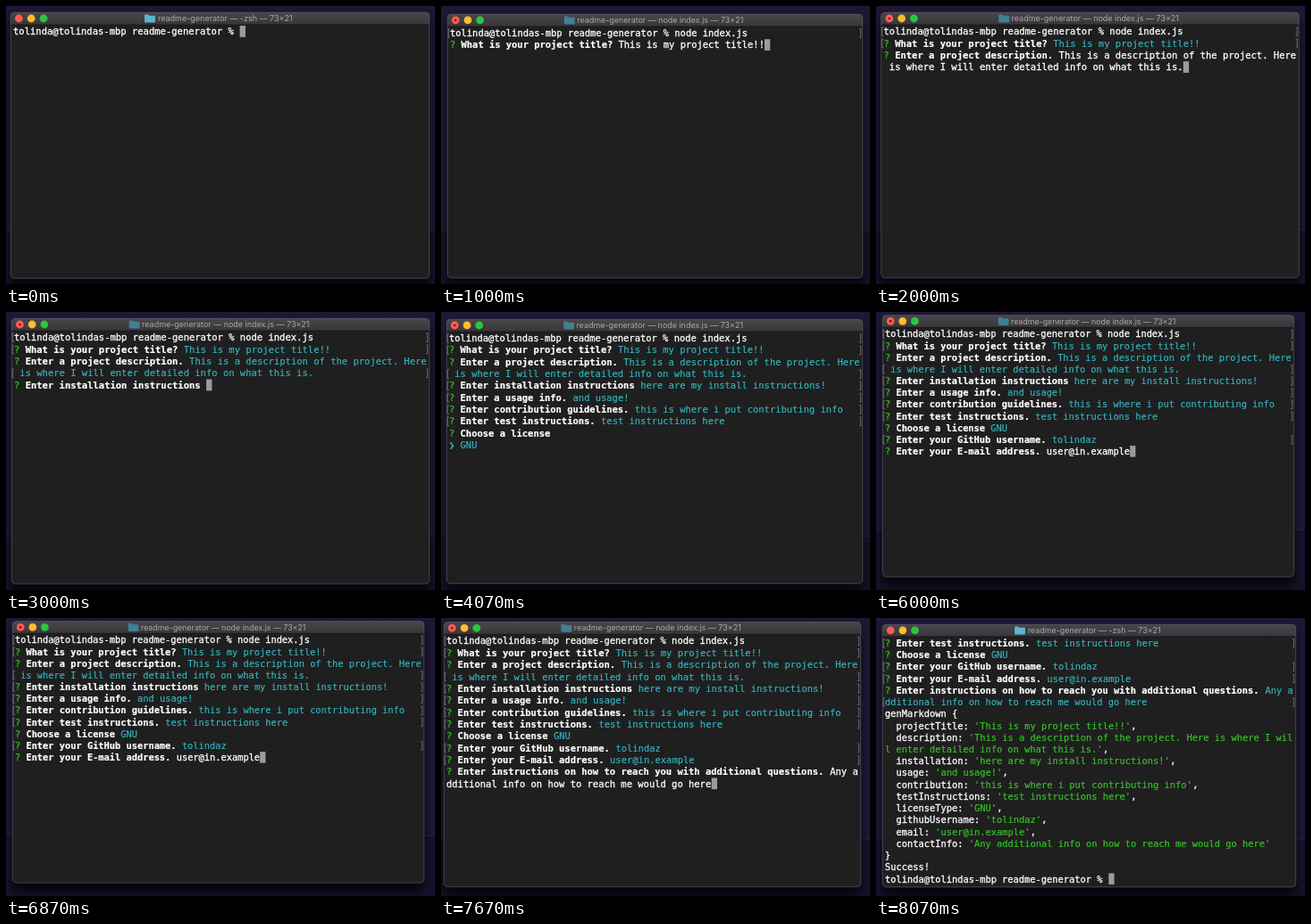
These frames come from a looping animation (480x312 px, 8990 ms). An HTML page:

```html
<!DOCTYPE html>
<html lang="en">
<head>
<meta charset="utf-8">
<title>Terminal questionnaire</title>
<style>
html, body { margin: 0; width: 100%; height: 100%; overflow: hidden; background: #130f27; }
svg { display: block; width: 480px; height: 312px; }
text { white-space: pre; }
.mono { font: 10.53px "DejaVu Sans Mono", "Noto Sans Mono", monospace; }
.plain { fill: #fff; stroke: #fff; stroke-width: .3; }
.bold { fill: #fff; stroke: #fff; stroke-width: .2; font-weight: 700; }
.cyan { fill: #35b6c1; stroke: #35b6c1; stroke-width: .15; }
.green { fill: #35c229; stroke: #35c229; stroke-width: .2; }
.title { font: 9px Inter, Roboto, sans-serif; fill: #aaa8ab; text-anchor: middle; }
.mark { fill: none; stroke: #858585; stroke-width: .8; }
</style>
</head>
<body>
<svg viewBox="0 0 480 312">
  <defs>
    <linearGradient id="bar" x2="0" y2="1">
      <stop stop-color="#4a464b"/><stop offset="1" stop-color="#39363a"/>
    </linearGradient>
    <filter id="blur" x="-10%" y="-10%" width="120%" height="120%">
      <feGaussianBlur stdDeviation="6"/>
    </filter>
  </defs>
  <g id="window">
    <rect x="-20" y="-20" width="520" height="265" fill="#1e1836"/>
    <rect x="-20" y="245" width="520" height="90" fill="#17122c"/>
    <path d="M-20 245H500" stroke="#332c4a" stroke-width=".8"/>
    <rect y="8" width="469" height="301" rx="5" fill="#000" opacity=".75" filter="url(#blur)"/>
    <rect width="469" height="299" rx="4.5" fill="#1f1f1f"/>
    <path d="M0 14V4.5Q0 0 4.5 0H464.5Q469 0 469 4.5V14Z" fill="url(#bar)"/>
    <path d="M0 14H469" stroke="#111" stroke-width=".6"/>
    <rect x=".3" y=".3" width="468.4" height="298.4" rx="4.5" fill="none" stroke="#5a565e" stroke-width=".7"/>
    <circle cx="9.4" cy="7" r="4.4" fill="#ff5b52"/>
    <circle cx="23.2" cy="7" r="4.4" fill="#fdbc2e"/>
    <circle cx="37" cy="7" r="4.4" fill="#28c73f"/>
    <circle id="busy" cx="9.4" cy="7" r="1.3" fill="#7c0f0b"/>
    <path id="folder" d="M0 3.2V1.2Q0 0 1.2 0H4L5.2 1.2H10.8Q12 1.2 12 2.4V8Q12 9 11 9H1Q0 9 0 8Z"/>
    <text id="title" class="title" x="240.3" y="10.2"></text>
    <g id="screen"></g>
  </g>
</svg>
<script>
const LOOP = 8990, SLIDE = 1000;
const COLS = 73, ROWS = 21, CELL = 6.34, LINE = 13.4, LEFT = 3, TOP = 15.1;
const PROMPT = 'tolinda@tolindas-mbp readme-generator % ';

// question, answer, key in the printed object
const FIELDS = [
  ['What is your project title?', 'This is my project title!!', 'projectTitle'],
  ['Enter a project description.', 'This is a description of the project. Here is where I will enter detailed info on what this is.', 'description'],
  ['Enter installation instructions', 'here are my install instructions!', 'installation'],
  ['Enter a usage info.', 'and usage!', 'usage'],
  ['Enter contribution guidelines.', 'this is where i put contributing info', 'contribution'],
  ['Enter test instructions.', 'test instructions here', 'testInstructions'],
  ['Choose a license', 'GNU', 'licenseType'],
  ['Enter your GitHub username.', 'tolindaz', 'githubUsername'],
  ['Enter your E-mail address.', 'user@in.example', 'email'],
  ['Enter instructions on how to reach you with additional questions.', 'Any additional info on how to reach me would go here', 'contactInfo']
];
const LICENSE = 6;

const line = (runs, marked = false) => ({ runs, marked });
const plain = (text, marked) => line([['plain', text]], marked);
const ask = (index, answer, style, marked) => line(
  [['green', '? '], ['bold', FIELDS[index][0] + ' '], [style, answer]], marked);

function session(answered, current) {
  const lines = [plain(PROMPT + 'node index.js', true)];
  for (let i = 0; i < answered; i++) lines.push(ask(i, FIELDS[i][1], 'cyan', i !== LICENSE));
  return current === undefined ? lines : [...lines, ask(answered, current, 'plain')];
}

const typed = index => session(index, FIELDS[index][1]);

function result() {
  const entries = FIELDS.map(([, answer, key], i) => line([
    ['plain', `  ${key}: `], ['green', `'${answer}'`], ['plain', i < FIELDS.length - 1 ? ',' : '']
  ]));
  return [...session(FIELDS.length), plain('genMarkdown {'), ...entries,
    plain('}'), plain('Success!'), plain(PROMPT)];
}

const slide = (x, y, width, lines, options) =>
  ({ x, y, width, lines, running: true, cursor: true, ...options });

const slides = [
  slide(5, 7, 469, [plain(PROMPT)], { running: false }),
  slide(7, 9, 465, typed(0)),
  slide(5.5, 7, 468, typed(1)),
  slide(6, 7, 468, session(2, '')),
  slide(6, 8, 466, [...session(LICENSE, ''), line([['cyan', '❯ GNU']])], { cursor: false }),
  slide(5, 9, 463, session(8, '')),
  slide(7, 3.5, 461, typed(8)),
  slide(3, 4.3, 467, typed(9)),
  slide(7, 7, 463, result(), { running: false })
];

// Breaks styled runs into terminal rows of COLS characters.
function wrap({ runs, marked }) {
  const rows = [{ cells: [], length: 0 }];
  for (let [style, text] of runs) {
    while (text) {
      let row = rows[rows.length - 1];
      if (row.length === COLS) rows.push(row = { cells: [], length: 0 });
      const part = text.slice(0, COLS - row.length);
      row.cells.push({ style, text: part, column: row.length });
      row.length += part.length;
      text = text.slice(part.length);
    }
  }
  rows[rows.length - 1].marked = marked;
  return rows;
}

const escapeText = text => text.replace(/&/g, '&amp;').replace(/</g, '&lt;');
const columnX = column => LEFT + column * CELL;

function rowMarkup(row, index) {
  const y = TOP + index * LINE;
  const text = row.cells.map(({ style, text, column }) =>
    `<text class="mono ${style}" x="${columnX(column)}" y="${y + 10.2}">${escapeText(text)}</text>`).join('');
  const marks = row.marked
    ? `<path class="mark" d="M3 ${y + 1.8}h-1.7v9.6h1.7M465 ${y + 1.8}h1.7v9.6h-1.7"/>` : '';
  return text + marks;
}

const find = id => document.getElementById(id);

function show({ x, y, width, lines, running, cursor }) {
  const rows = lines.flatMap(wrap).slice(-ROWS);
  const last = rows.length - 1;
  const block = cursor
    ? `<rect x="${columnX(rows[last].length)}" y="${TOP + last * LINE}" width="${CELL}" height="12.8" fill="#9b9b9b"/>` : '';
  find('screen').innerHTML = block + rows.map(rowMarkup).join('');
  find('window').setAttribute('transform', `translate(${x} ${y}) scale(${width / 469})`);
  find('title').textContent = `readme-generator — ${running ? 'node index.js' : '-zsh'} — 73×21`;
  find('folder').setAttribute('transform', `translate(${running ? 132 : 150} 2.6)`);
  find('folder').setAttribute('fill', running ? '#417f93' : '#5bb5d1');
  find('busy').setAttribute('visibility', running ? 'visible' : 'hidden');
}

let shown = -1;
const start = performance.now();

function update() {
  const index = Math.floor((performance.now() - start) % LOOP / SLIDE);
  if (index !== shown) show(slides[shown = index]);
  requestAnimationFrame(update);
}
update();
</script>
</body>
</html>
```
